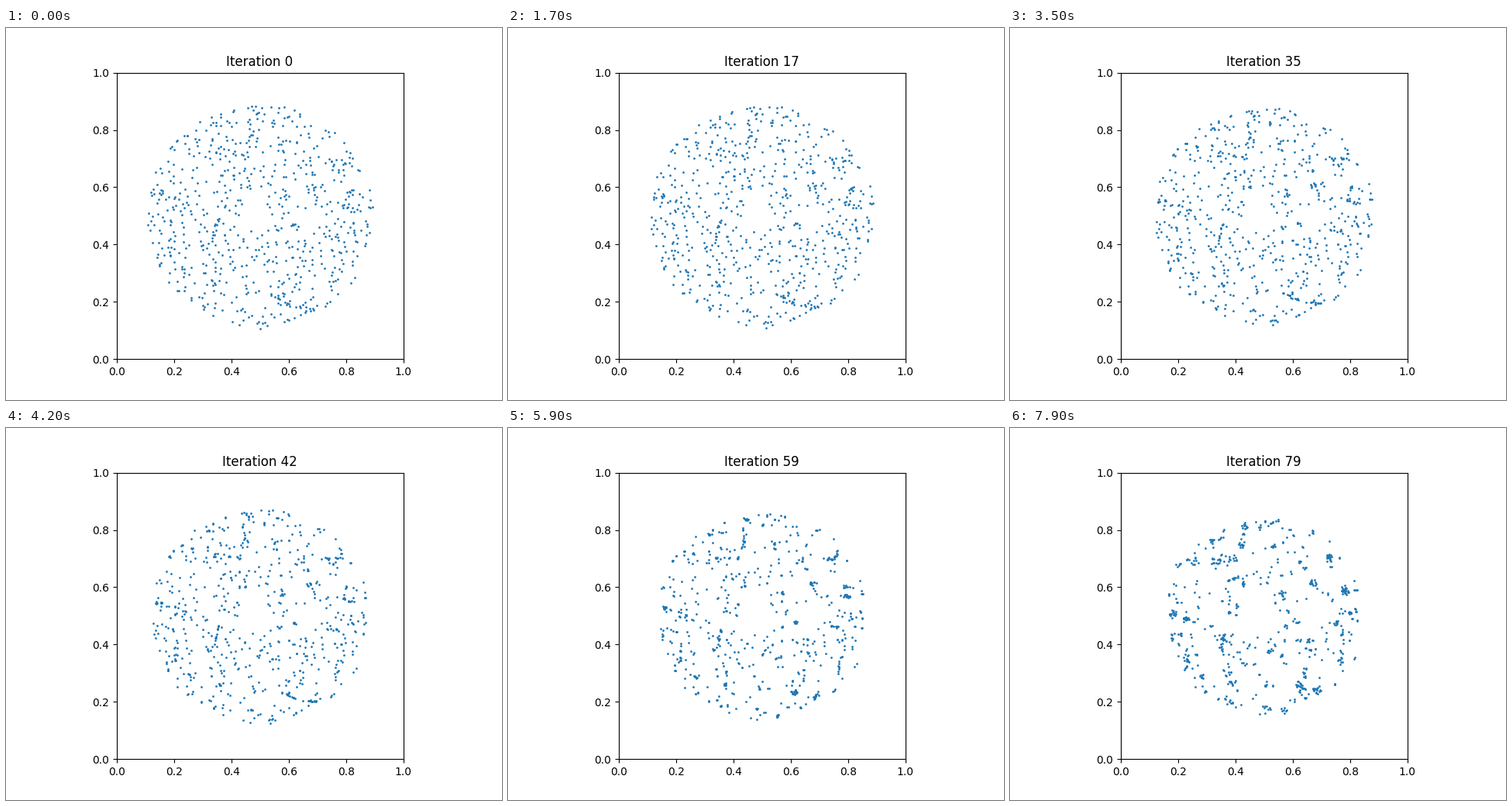
These frames come from a looping animation (640 px wide and 480 px high, 8 s). A matplotlib script:

```python
import numpy as np
import matplotlib.pyplot as plt
from matplotlib.animation import FuncAnimation

STEPS = 80
COUNT = 700
RADIUS = 0.395
SPIN = 0.00206        # initial solid-body rotation, rad per step
SOFTENING = 0.015
RIM_PULL = 1.65e-5    # mean inward acceleration near the rim


def initial_positions():
    """Uniform disc with a small hollow, relative to the axes centre."""
    rng = np.random.default_rng(4)
    radius = RADIUS * np.sqrt(rng.random(2 * COUNT))
    angle = 2 * np.pi * rng.random(2 * COUNT)
    pos = np.column_stack([radius * np.cos(angle), radius * np.sin(angle)])
    hollow = np.hypot(pos[:, 0] + 0.02, pos[:, 1] - 0.01) < 0.045
    return pos[~hollow][:COUNT]


def pull(pos):
    """Softened inverse-square attraction between all bodies."""
    dx = pos[None, :, 0] - pos[:, None, 0]
    dy = pos[None, :, 1] - pos[:, None, 1]
    d2 = dx * dx + dy * dy + SOFTENING ** 2
    weight = 1 / (d2 * np.sqrt(d2))
    return np.column_stack([(dx * weight).sum(1), (dy * weight).sum(1)])


def simulate():
    pos = initial_positions()
    vel = SPIN * np.column_stack([-pos[:, 1], pos[:, 0]])

    radius = np.hypot(*pos.T)
    inward = -(pull(pos) * pos).sum(1) / radius
    gravity = RIM_PULL / inward[radius > 0.9 * RADIUS].mean()

    path = [pos]
    for _ in range(STEPS - 1):
        vel = vel + gravity * pull(pos)
        pos = pos + vel
        path.append(pos)
    return 0.5 + np.array(path)


path = simulate()

fig, ax = plt.subplots(figsize=(6.4, 4.8), dpi=100)
ax.set_aspect("equal")
ax.set_xlim(0, 1)
ax.set_ylim(0, 1)
dots, = ax.plot([], [], "o", color="#1f77b4", markersize=1)
title = ax.set_title("Iteration 0", x=0.4985)


def update(step):
    dots.set_data(path[step, :, 0], path[step, :, 1])
    title.set_text(f"Iteration {step}")
    return dots, title


anim = FuncAnimation(fig, update, frames=STEPS, interval=100,
                     repeat=True, repeat_delay=0, blit=False)
plt.show()
```
